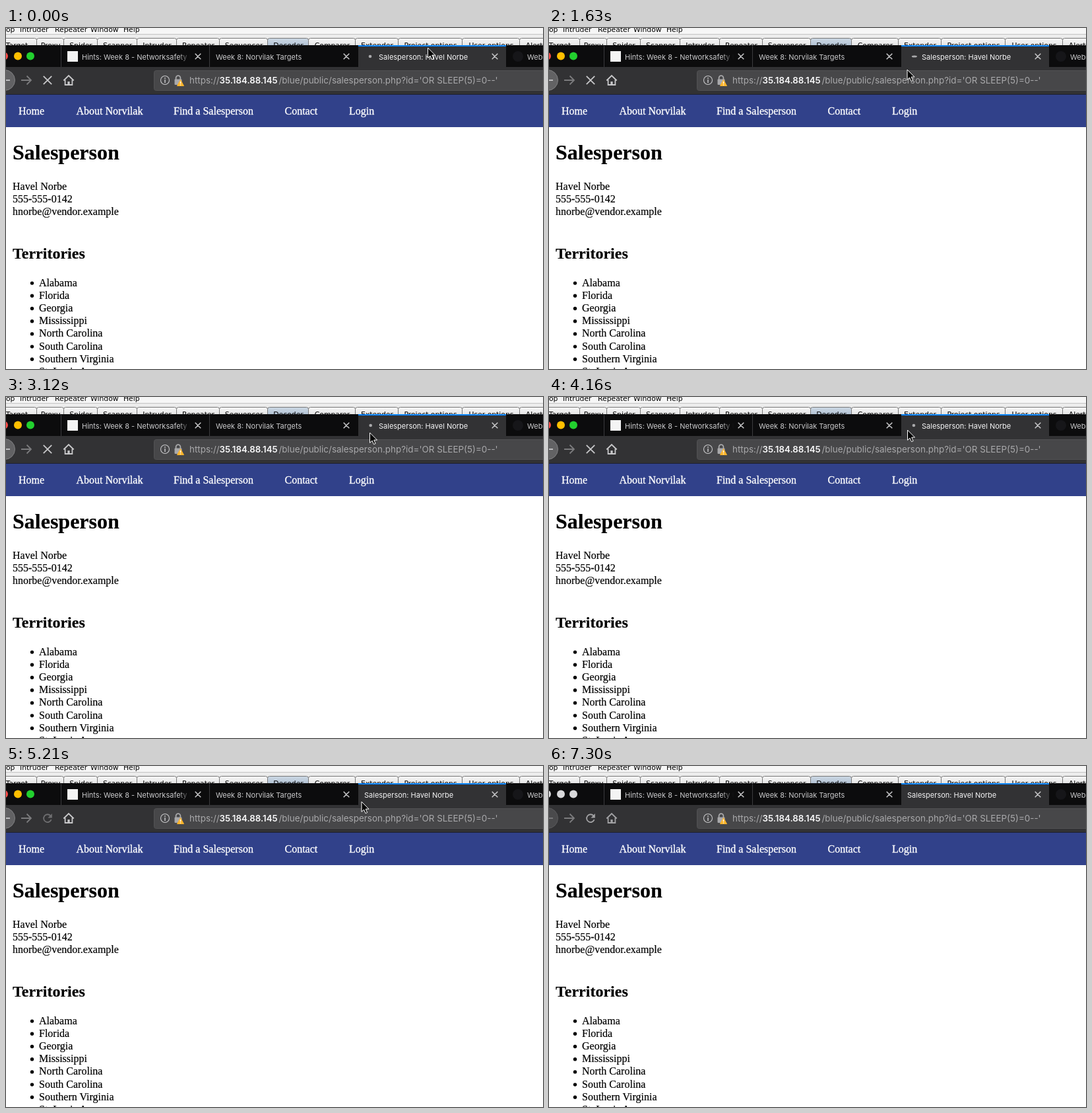
An HTML page that plays this animation: 814 px wide and 516 px high, repeating every 7.4 s.

```html
<!DOCTYPE html>
<html lang="en">
<head>
<meta charset="utf-8">
<title>Salesperson page</title>
<style>
html, body { margin: 0; width: 100%; height: 100%; overflow: hidden; background: #fff; }
svg { display: block; }
text { white-space: pre; }
.menu { font: 10.8px "DejaVu Sans", sans-serif; fill: #000; }
.tab { font: 11px Inter, sans-serif; fill: #c9c9cb; }
.url { font: 13.45px Inter, sans-serif; fill: #a9a9ab; }
.page { font: 16px "Liberation Serif", serif; fill: #000; }
.page text { stroke: #000; stroke-width: .2; }
.page .nav { fill: #fff; stroke: #fff; stroke-width: .3; }
.line { fill: none; stroke: #c8c8ca; stroke-width: 1.8; }
</style>
</head>
<body>
<svg id="stage" width="814" height="516" viewBox="0 0 814 516">
  <defs>
    <linearGradient id="fade" gradientUnits="userSpaceOnUse" x1="262" x2="280">
      <stop stop-color="#c9c9cb"/><stop offset="1" stop-color="#c9c9cb" stop-opacity="0"/>
    </linearGradient>
    <linearGradient id="plain" x2="0" y2="1"><stop stop-color="#f6f6f6"/><stop offset="1" stop-color="#d9d9d9"/></linearGradient>
    <linearGradient id="picked" x2="0" y2="1"><stop stop-color="#ccd8e4"/><stop offset="1" stop-color="#9fb2c8"/></linearGradient>
  </defs>
  <rect width="814" height="516" fill="#fff"/>
  <rect width="814" height="10" fill="#f6f6f6"/>
  <rect y="10" width="814" height="16" fill="#ececec"/>
  <rect y="9" width="814" height="1" fill="#c4c4c4"/>
  <g id="tools"></g>

  <rect y="26" width="814" height="33" fill="#0c0c0d"/>
  <rect y="59" width="814" height="41" fill="#323234"/>
  <rect x="534" y="26" width="224" height="33" fill="#323234"/>
  <rect x="534" y="26" width="224" height="2" fill="#0a84ff"/>
  <path d="M83.5 27V59M308.5 27V59" stroke="#3b3b3d"/>
  <g id="lights"><circle cx="-3" cy="42.5" r="6"/><circle cx="18" cy="42.5" r="6"/><circle cx="37" cy="42.5" r="6"/></g>
  <rect x="93" y="35" width="16" height="16" fill="#f4f4f4"/>
  <circle cx="776" cy="43" r="8" fill="#161619"/>
  <path class="line" style="stroke-width:1.5" id="closers"/>
  <text class="tab" x="115" y="47.5" style="fill:url(#fade)">Hints: Week 8 - Networksafety Unit</text>
  <text class="tab" x="318" y="47.5">Week 8: Norvilak Targets</text>
  <text class="tab" id="label" y="47.5" style="fill:#f5f5f6">Salesperson: Havel Norbe</text>
  <text class="tab" x="790" y="47.5">Webs</text>
  <ellipse id="dot" cy="43" fill="#a9a9ab"/>

  <g id="back">
    <circle cx="-2" cy="79" r="15.5" fill="#626264" stroke="#808082"/>
    <path class="line" d="M0 79H6"/>
  </g>
  <path class="line" d="M23 79H38M31.5 72.5L38 79L31.5 85.5" style="stroke:#7b7b7d"/>
  <path class="line" id="stop" d="M56.8 72.8L69.2 85.2M69.2 72.8L56.8 85.2"/>
  <g id="reload">
    <path class="line" d="M67.4 75.2A5.9 5.9 0 1 0 68.6 81"/>
    <path d="M69.8 72V78.4H63.4Z" fill="#c8c8ca"/>
  </g>
  <g id="home">
    <path class="line" d="M87.3 79.5L95 72L102.7 79.5M89.6 78.5V86H100.4V78.5"/>
    <rect x="93.4" y="81" width="3.2" height="5" fill="#c8c8ca"/>
  </g>
  <rect x="224.5" y="64.5" width="620" height="30" rx="3" fill="#474749" stroke="#525254"/>
  <circle class="line" cx="241" cy="79" r="6.5" style="stroke-width:1.1"/>
  <path d="M241 75V76.7M241 78V83" stroke="#c8c8ca" stroke-width="1.5"/>
  <path class="line" d="M257.6 78V75.5A3.4 3.4 0 0 1 264.4 75.5V78" style="stroke:#a9a9ab"/>
  <rect x="255.5" y="77.5" width="11" height="8.5" rx="1" fill="#a9a9ab"/>
  <path d="M264.5 78.5L269.5 87.5H259.5Z" fill="#ffb52b" stroke="#ffb52b" stroke-linejoin="round"/>
  <path d="M264.5 80.8V84.2M264.5 85.4V86.8" stroke="#fff" stroke-width="1.3"/>
  <text class="url" x="278" y="84.2">https://</text>
  <text class="url" x="323.5" y="84.2" style="font-size:13.3px;font-weight:600;fill:#f9f9fa">35.184.88.145</text>
  <text class="url" x="413.5" y="84.2">/blue/public/salesperson.php?id='OR SLEEP(5)=0--'</text>

  <rect y="100" width="814" height="50" fill="#31418a"/>
  <rect y="100" width="814" height="1" fill="#1d2030"/>
  <g id="page" class="page"></g>

  <path id="arrow" d="M0 0V15.3L3.5 12L6 17.6L8.6 16.5L6.2 11.1H11Z" fill="#000" stroke="#fff"/>
  <path id="resize" d="M0 -9L4.5 -4H1.3V4H4.5L0 9L-4.5 4H-1.3V-4H-4.5Z" fill="#000" stroke="#fff"/>
</svg>
<script>
const $ = id => document.getElementById(id);
const text = (x, y, s, extra = '') => `<text x="${x}" y="${y}" ${extra}>${s}</text>`;

// Tool window behind the browser: [left edge, label]
const tools = [[-14, 'Target'], [47, 'Proxy'], [88, 'Spider'], [139, 'Scanner'], [199, 'Intruder'],
  [259, 'Repeater'], [324, 'Sequencer'], [397, 'Decoder'], [459, 'Comparer'], [530, 'Extender'],
  [595, 'Project options'], [692, 'User options'], [779, 'Alerts'], [828, '']];
const menu = [[0, 'op'], [21, 'Intruder'], [74, 'Repeater'], [128, 'Window'], [178, 'Help']];
$('tools').setAttribute('class', 'menu');
$('tools').innerHTML = menu.map(([x, s]) => text(x, 5.5, s)).join('') +
  tools.slice(0, -1).map(([x, s], i) => {
    const w = tools[i + 1][0] - x;
    return `<rect x="${x - .5}" y="15.5" width="${w}" height="20" rx="3" stroke="#777"
      fill="url(#${s === 'Decoder' ? 'picked' : 'plain'})"/>` +
      text(x + w / 2, 30, s, 'text-anchor="middle"');
  }).join('');

$('closers').setAttribute('d', [291, 516, 741].map(x =>
  `M${x - 4.3} 38.7l8.6 8.6m0 -8.6l-8.6 8.6`).join(''));

const nav = [[19, 'Home'], [106.5, 'About Norvilak'], [254, 'Find a Salesperson'], [422.5, 'Contact'], [520, 'Login']];
const contact = ['Havel Norbe', '555-555-0142', 'hnorbe@vendor.example'];
const places = ['Alabama', 'Florida', 'Georgia', 'Mississippi', 'North Carolina',
  'South Carolina', 'Southern Virginia', 'St. Louis Area'];
$('page').innerHTML =
  nav.map(([x, s]) => text(x, 131, s, 'class="nav"')).join('') +
  text(10, 199, 'Salesperson', 'style="font-size:32px;font-weight:bold"') +
  contact.map((s, i) => text(10, 245 + 19.2 * i, s)).join('') +
  text(10, 349, 'Territories', 'style="font-size:24px;font-weight:bold"') +
  places.map((s, i) => {
    const y = 390.6 + 19.2 * i;
    return `<circle cx="39.5" cy="${y - 4.5}" r="2.7"/>` + text(50, y, s);
  }).join('');

// Pointer path: [step, x, y]
const path = [[0, 639.5, 30], [2, 596, 44], [4, 562, 40], [6, 549, 30], [7, 548, 27], [8, 540, 56],
  [9, 541, 62], [11, 543, 63], [16, 549, 56], [21, 551.5, 54], [23, 549, 53], [28, 543.5, 50],
  [35, 539, 54], [38, 539, 54], [39, 500, 95], [40, 423, 190], [41, 490, 300], [42, 590, 370],
  [43, 613, 381], [44, 613, 381], [45, 680, 430], [46, 794, 503], [47, 830, 540], [50, 830, 540]];

function pointer(n) {
  const i = path.findIndex(p => p[0] > n);
  const [a, ax, ay] = path[i - 1], [b, bx, by] = path[i];
  const k = (n - a) / (b - a);
  return `translate(${ax + (bx - ax) * k} ${ay + (by - ay) * k})`;
}

const show = (id, on) => $(id).style.display = on ? '' : 'none';
const LOOP = 7400, STEP = 148.9, LOADED = 31, ENABLED = 36, INACTIVE = 49;

function draw(now) {
  const n = Math.floor((now % LOOP + 13) / STEP);
  const loading = n < LOADED, active = n < INACTIVE;

  // Throbber: swings sideways, flattening halfway through its 1.05 s cycle
  const phase = n * STEP / 1050 % 1;
  const flat = Math.sin(Math.PI * phase) ** 2;
  show('dot', loading);
  $('dot').setAttribute('cx', 552 - 5 * Math.sin(2 * Math.PI * phase));
  $('dot').setAttribute('rx', 2.3 + 1.8 * flat);
  $('dot').setAttribute('ry', 2.3 - .8 * flat);
  $('label').setAttribute('x', loading ? 565 : n === LOADED ? 552 : 543);

  show('stop', loading);
  show('reload', !loading);
  $('reload').style.opacity = n < ENABLED ? .4 : active ? 1 : .75;
  $('home').style.opacity = active ? 1 : .75;
  $('back').style.opacity = active ? 1 : .5;
  const colors = active ? ['#ff4b47', '#ffbf00', '#22d02e'] : Array(3).fill('#d9d9db');
  [...$('lights').children].forEach((c, i) => c.setAttribute('fill', colors[i]));

  const sizing = n === 7;
  show('resize', sizing);
  show('arrow', !sizing);
  $(sizing ? 'resize' : 'arrow').setAttribute('transform', pointer(n));
}

const start = performance.now();
(function tick() {
  draw(performance.now() - start);
  requestAnimationFrame(tick);
})();
</script>
</body>
</html>
```
